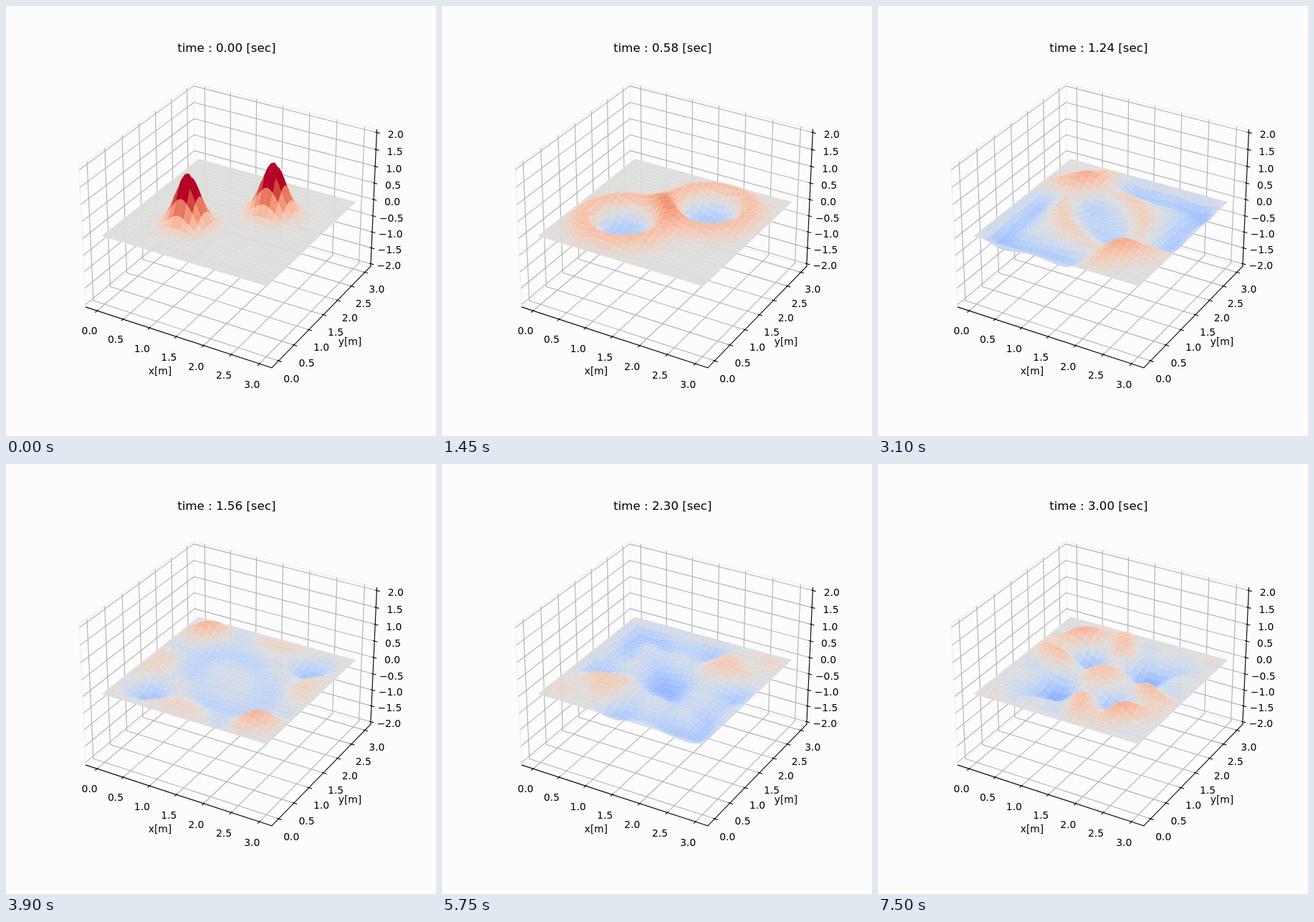
An HTML page with a canvas that plays this animation: 600x600 px, repeating every 7.55 s.

```html
<!DOCTYPE html>
<html lang="en">
<head>
<meta charset="utf-8">
<title>Wave on a square membrane</title>
<style>
  html, body { margin: 0; width: 100%; height: 100%; overflow: hidden; background: #fcfcfc; }
  svg, canvas { position: absolute; left: 0; top: 0; width: 600px; height: 600px; }
  text { font-family: "DejaVu Sans", sans-serif; font-size: 13.89px; text-anchor: middle; fill: #000; }
  #title { font-size: 16.67px; }
  polyline { fill: none; stroke-width: 1.11; }
  .pane { stroke: #eeeeee; }
  .grid { stroke: #b0b0b0; stroke-linejoin: round; }
  .axis { stroke: #000; stroke-linecap: square; }
  .tick { stroke: #000; }
</style>
</head>
<body>
<svg id="axes" viewBox="0 0 600 600"><text id="title" x="307.8" y="64"></text></svg>
<canvas id="surface" width="600" height="600"></canvas>
<script>
const SIZE = 3, N = 60, STRIDE = 2, W = N + 1;
const DX = SIZE / N, DT = 0.02, FRAMES = 151, FRAME_MS = 50;

// ---- perspective camera: elevation 30, azimuth -60, distance 10 ----
const C30 = Math.sqrt(3) / 2, SCALE = 462 / 0.185;
const CX = 76.5 + 0.095 * SCALE, CY = 534 - 0.095 * SCALE;
const KXY = 8 / 7 / 3.3, KZ = 6 / 7 / 4;

function project(x, y, z) {
  const a = (x - 1.5) * KXY, b = (y - 1.5) * KXY, c = z * KZ;
  const right = C30 * a + 0.5 * b;
  const up = -0.25 * a + C30 / 2 * b + C30 * c;
  const depth = 10 - (C30 / 2 * a - 0.75 * b + 0.5 * c);
  return [CX + SCALE * right / depth, CY - SCALE * up / depth, depth];
}

// ---- axes ----
const svg = document.getElementById('axes');
const title = document.getElementById('title');

function add(tag, attrs) {
  const el = document.createElementNS('http://www.w3.org/2000/svg', tag);
  for (const k in attrs) el.setAttribute(k, attrs[k]);
  svg.appendChild(el);
  return el;
}

function line(cls, ...pts) {
  const points = pts.map(p => project(...p).slice(0, 2).map(v => v.toFixed(2)).join()).join(' ');
  add('polyline', { class: cls, points });
}

function label(str, x, y) {
  add('text', { x: x.toFixed(2), y }).textContent = str;
}

function tickLabel(value, ...p) {
  const [x, y] = project(...p);
  label(value.toFixed(1).replace('-', '\u2212'), x, Math.round(y + 11.2));
}

function drawAxes() {
  const lo = -0.21875, hi = 3.21875, zLo = -2 - 1 / 12, zHi = -zLo;
  const dxy = 0.275, dz = 1 / 3, far = 0.83;
  const out = 0.2 * dxy, inn = 0.1 * dxy;
  const xy = Array.from({ length: 7 }, (_, i) => i / 2);
  const zs = Array.from({ length: 9 }, (_, i) => i / 2 - 2);

  line('pane', [lo, lo, zLo], [lo, hi, zLo], [lo, hi, zHi], [lo, lo, zHi], [lo, lo, zLo]);
  line('pane', [lo, hi, zLo], [hi, hi, zLo], [hi, hi, zHi], [lo, hi, zHi]);
  line('pane', [lo, lo, zLo], [hi, lo, zLo], [hi, hi, zLo]);

  for (const v of xy) {
    line('grid', [v, lo, zLo], [v, hi, zLo], [v, hi, zHi]);
    line('grid', [hi, v, zLo], [lo, v, zLo], [lo, v, zHi]);
  }
  for (const v of zs) line('grid', [lo, lo, v], [lo, hi, v], [hi, hi, v]);

  line('axis', [lo, lo, zLo], [hi, lo, zLo]);
  line('axis', [hi, lo, zLo], [hi, hi, zLo]);
  line('axis', [hi, hi, zLo], [hi, hi, zHi]);

  const push = far * dxy, drop = far * dz;
  for (const v of xy) {
    line('tick', [v, lo + inn, zLo], [v, lo - out, zLo]);
    tickLabel(v, v, lo - push, zLo - drop);
    line('tick', [hi - inn, v, zLo], [hi + out, v, zLo]);
    tickLabel(v, hi + push, v, zLo - drop);
  }
  for (const v of zs) {
    line('tick', [hi - inn, hi, v], [hi + out, hi, v]);
    tickLabel(v, hi + push, hi + push, v);
  }
  label('x[m]', 215, 514);
  label('y[m]', 480, 473);
}

// ---- diverging palette, values from -1 to 1 ----
const STOPS = ('3b4cc0 4d68d7 6282ea 779af7 8db0fe a3c2ff b8d0f9 ccd9ee dddddd ' +
  'ecd3c5 f5c4ad f7b194 f49a7b ec7f63 de604d cb3e38 b40426').split(' ')
  .map(h => [0, 2, 4].map(i => parseInt(h.substr(i, 2), 16)));

const PALETTE = Array.from({ length: 256 }, (_, i) => {
  const f = i / 255 * (STOPS.length - 1);
  const k = Math.min(Math.floor(f), STOPS.length - 2);
  const rgb = STOPS[k].map((v, c) => Math.round(v + (STOPS[k + 1][c] - v) * (f - k)));
  return `rgb(${rgb})`;
});

const colour = z => PALETTE[Math.max(0, Math.min(255, Math.floor((z + 1) * 128)))];

// ---- wave equation with fixed edges, speed 1, starting at rest ----
function simulate() {
  const bump = (x, y, c) => 1.5 * Math.exp(-((x - c) ** 2 + (y - c) ** 2) / 0.08);
  const k = (DT / DX) ** 2;
  const first = new Float64Array(W * W);
  for (let j = 1; j < N; j++)
    for (let i = 1; i < N; i++)
      first[j * W + i] = bump(i * DX, j * DX, 1) + bump(i * DX, j * DX, 2);

  const states = [first];
  while (states.length < FRAMES) {
    const u = states[states.length - 1], prev = states[states.length - 2];
    const next = new Float64Array(W * W);
    for (let j = 1; j < N; j++)
      for (let i = 1; i < N; i++) {
        const n = j * W + i;
        const lap = k * (u[n - 1] + u[n + 1] + u[n - W] + u[n + W] - 4 * u[n]);
        next[n] = prev ? 2 * u[n] - prev[n] + lap : u[n] + lap / 2;
      }
    states.push(next);
  }
  return states;
}

// ---- surface patches, each with its outline of eight grid points ----
const RING = [[0, 0], [1, 0], [2, 0], [2, 1], [2, 2], [1, 2], [0, 2], [0, 1]];
const patches = [];
for (let j = 0; j < N; j += STRIDE)
  for (let i = 0; i < N; i += STRIDE)
    patches.push(RING.map(([a, b]) => (j + b) * W + i + a));

const ctx = document.getElementById('surface').getContext('2d');

function drawSurface(u) {
  const pts = Array.from(u, (z, n) => project(n % W * DX, Math.floor(n / W) * DX, z));
  const mean = (ring, get) => ring.reduce((s, n) => s + get(n), 0) / ring.length;
  const sorted = patches
    .map(ring => ({ ring, depth: mean(ring, n => pts[n][2]) }))
    .sort((a, b) => b.depth - a.depth);

  ctx.clearRect(0, 0, 600, 600);
  for (const { ring } of sorted) {
    ctx.beginPath();
    for (const n of ring) ctx.lineTo(pts[n][0], pts[n][1]);
    ctx.closePath();
    ctx.fillStyle = colour(mean(ring, n => u[n]));
    ctx.fill();
  }
}

const states = simulate();
let shown = -1;

function show(ms) {
  const frame = Math.floor(ms / FRAME_MS) % FRAMES;
  if (frame === shown) return;
  shown = frame;
  title.textContent = `time : ${(frame * DT).toFixed(2)} [sec]`;
  drawSurface(states[frame]);
}

drawAxes();
show(0);
const start = performance.now();
function tick() {
  show(Math.max(0, performance.now() - start));
  requestAnimationFrame(tick);
}
requestAnimationFrame(tick);
</script>
</body>
</html>
```
